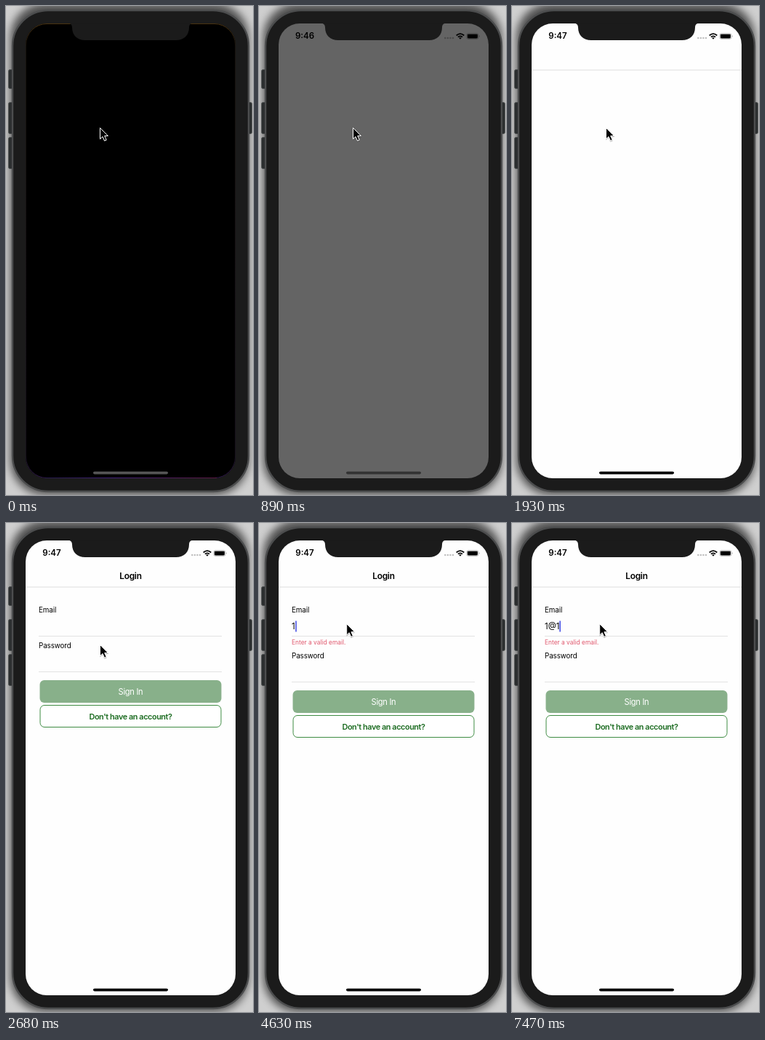
These frames come from a looping animation (340x672 px, 8000 ms). An HTML page:

```html
<!DOCTYPE html>
<html lang="en">
<head>
<meta charset="utf-8">
<title>Login form</title>
<style>
  html, body { margin: 0; width: 100%; height: 100%; overflow: hidden; background: #cfcfcf; }
  svg { display: block; width: 340px; height: 672px; font-family: Inter, Roboto, sans-serif; }
  .label { font-size: 9.8px; letter-spacing: -.01em; }
  .input { font-size: 11.4px; }
  .button { font-size: 11.2px; letter-spacing: -.03em; text-anchor: middle; }
  .bold { font-weight: 600; text-anchor: middle; }
</style>
</head>
<body>
<svg viewBox="0 0 340 672">
  <defs>
    <filter id="blur" x="-20%" y="-20%" width="140%" height="140%"><feGaussianBlur stdDeviation="6"/></filter>
    <filter id="soft" x="-50%" y="-50%" width="200%" height="200%">
      <feDropShadow dx="0" dy="1" stdDeviation=".7" flood-opacity=".35"/>
    </filter>
    <linearGradient id="warm" x1="0" x2="0" y1="0" y2="1">
      <stop offset="0" stop-color="#4a3310"/>
      <stop offset=".05" stop-color="#15110c"/>
      <stop offset=".95" stop-color="#15101a"/>
      <stop offset="1" stop-color="#30184c"/>
    </linearGradient>
    <linearGradient id="violet" gradientUnits="userSpaceOnUse" x1="50" x2="295" y1="0" y2="0">
      <stop offset="0" stop-color="#241a48"/>
      <stop offset=".4" stop-color="#43217a"/>
      <stop offset="1" stop-color="#5a1740"/>
    </linearGradient>
    <clipPath id="display"><rect x="27" y="24" width="289" height="625" rx="29"/></clipPath>
  </defs>

  <!-- phone body -->
  <rect width="340" height="672" fill="#cfcfcf"/>
  <rect x="6" y="-4" width="328" height="676" rx="48" opacity=".62" filter="url(#blur)"/>
  <g fill="#2b2e2f" stroke="#4b4e4f">
    <rect x="3.5" y="87.5" width="8" height="26" rx="2"/>
    <rect x="3.5" y="132.5" width="8" height="43" rx="2"/>
    <rect x="3.5" y="180.5" width="8" height="43" rx="2"/>
    <rect x="331" y="132.5" width="7.5" height="43" rx="2"/>
  </g>
  <rect x="9" y="6" width="325" height="661" rx="49" fill="#1b1b1b" stroke="#4c4d4e" stroke-width="2.4"/>

  <!-- display -->
  <g clip-path="url(#display)">
    <rect id="back" x="27" y="24" width="289" height="625"/>
    <path id="rule" d="M27 88H316" stroke="#dedede"/>
  </g>
  <g id="edge" fill="none">
    <rect x="27.5" y="24.5" width="288" height="624" rx="28.5" stroke="url(#warm)"/>
    <path d="M54 648.5H290" stroke="url(#violet)"/>
  </g>
  <path d="M85 23.5Q91 24 91 29.5C91 40 98 47 109 47H234C245 47 252 40 252 29.5Q252 24 258 23.5Z" fill="#1b1b1b"/>

  <g id="status">
    <text id="clock" class="bold" x="63" y="45.4" font-size="11.5"></text>
    <g opacity=".24">
      <circle cx="256.3" cy="44" r="1.3"/><circle cx="259.9" cy="44" r="1.3"/>
      <circle cx="263.4" cy="44" r="1.3"/><circle cx="267" cy="44" r="1.3"/>
    </g>
    <path d="M271.7 40.5Q277 35.8 282.3 40.5M273.9 42.6Q277 40 280.1 42.6" fill="none" stroke="#000" stroke-width="1.7"/>
    <path d="M275.1 43.8Q277 42.5 278.9 43.8L277 45.8Z"/>
    <rect x="285.9" y="37.9" width="16" height="7.4" rx="2.2" fill="none" stroke="#000" stroke-opacity=".4" stroke-width=".7"/>
    <rect x="286.9" y="38.8" width="14" height="5.6" rx="1.3"/>
    <path d="M302.9 40.3Q304.2 41.6 302.9 42.9Z" opacity=".5"/>
  </g>

  <g id="form">
    <text class="bold" x="171.5" y="77" font-size="11.9" letter-spacing="-.02em">Login</text>
    <text class="label" x="45" y="123">Email</text>
    <path d="M45 155.5H297" stroke="#e2e2e2"/>
    <text id="typed" class="input" x="45" y="146.3"></text>
    <text id="error" x="45" y="166.6" font-size="8.4" fill="#e0566c">Enter a valid email.</text>
    <g id="lower">
      <text class="label" x="45" y="172">Password</text>
      <path d="M45 204.5H297" stroke="#e2e2e2"/>
      <rect x="46.5" y="216" width="250" height="31" rx="6" fill="#88b08a"/>
      <text class="button" x="171.5" y="235.6" fill="#fff">Sign In</text>
      <rect x="47" y="250.5" width="249" height="30" rx="6" fill="#fff" stroke="#3f8c43"/>
      <text class="button bold" x="171.5" y="269.5" style="font-size:10.9px;letter-spacing:-.04em" fill="#1b6b20">Don't have an account?</text>
    </g>
    <rect id="caret" y="134.5" width="1.5" height="15" fill="#3c48e4"/>
  </g>

  <rect id="home" x="120" y="639.8" width="103" height="3.6" rx="1.8"/>
  <g id="touches" fill="#808080" fill-opacity=".45" stroke="#707070" stroke-opacity=".5">
    <circle cx="121.3" cy="137.8" r="13"/>
    <circle cx="226.7" cy="540.2" r="13"/>
  </g>
  <path id="pointer" d="M0 0V15.2L3.5 12L6.1 17.7L8.7 16.6L6.2 11H10.9Z" stroke="#fff" stroke-width="1" filter="url(#soft)"/>
</svg>

<script>
const LOOP = 8000;
const $ = id => document.getElementById(id);

// Each track lists [start time, value]; a value holds until the next start.
const tracks = {
  back: [[0, "#000"], [890, "#646464"], [1040, "#eee"], [1190, "#fefefe"]],
  home: [[0, "#555"], [890, "#333"], [1040, "#000"]],
  clock: [[0, "9:46"], [1930, "9:47"]],
  pointer: [[0, [129.5, 167.5]], [2980, [124.7, 155]], [3130, [120.7, 138.7]]],
  typed: [[0, ""], [4630, "1"], [7020, "1@"], [7470, "1@1"]],
  caretX: [[0, 45.2], [4630, 50.2], [7020, 60.7], [7470, 65.4]],
  caret: [[0, 0], [3580, 1], [4180, .5], [4330, 0], [4480, .5], [4630, 1],
          [5230, 0], [5530, .5], [5680, 1], [6130, .5], [6270, 0], [6570, 1]]
};
const at = (name, t) => tracks[name].findLast(([start]) => t >= start)[1];
const show = (id, on) => $(id).style.display = on ? "" : "none";

function draw() {
  const t = performance.now() % LOOP;
  const invalid = t >= 4630;

  $("back").setAttribute("fill", at("back", t));
  $("home").setAttribute("fill", at("home", t));
  $("clock").textContent = at("clock", t);
  $("typed").textContent = at("typed", t);
  $("caret").setAttribute("x", at("caretX", t));
  $("caret").setAttribute("opacity", at("caret", t));
  $("pointer").setAttribute("transform", `translate(${at("pointer", t)})`);
  $("lower").setAttribute("transform", `translate(0 ${invalid ? 14 : 0})`);

  show("edge", t < 140);
  show("status", t >= 890);
  show("rule", t >= 1190);
  show("form", t >= 2680);
  show("error", invalid);
  show("touches", t >= 6870 && t < 7020);
  requestAnimationFrame(draw);
}
draw();
</script>
</body>
</html>
```
